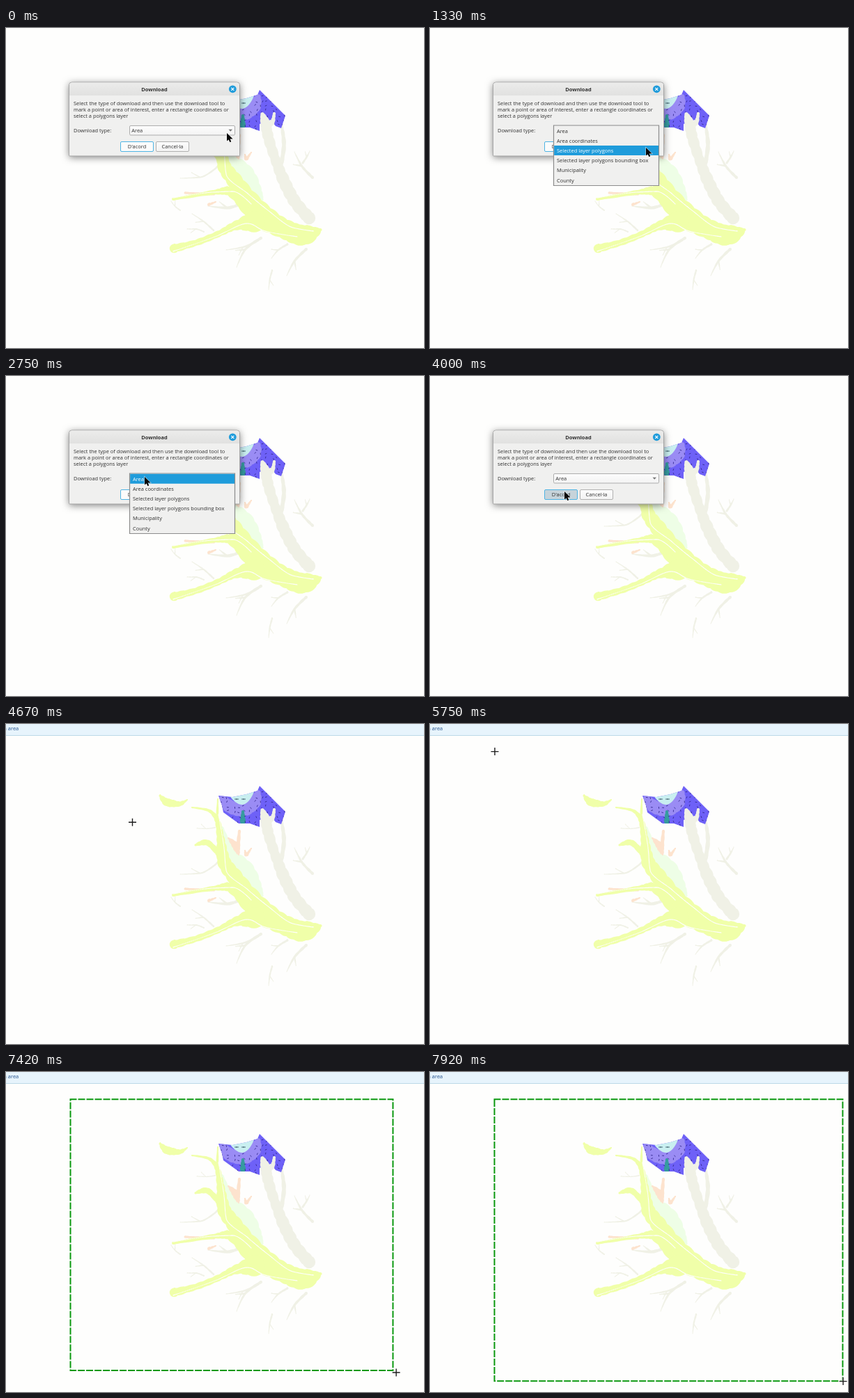
An HTML page with a canvas for the animation above (8000 ms loop, 600 by 460 pixels).

```html
<!DOCTYPE html>
<html lang="ca">
<head>
<meta charset="utf-8">
<title>Download area</title>
<style>
html, body { margin: 0; width: 100%; height: 100%; overflow: hidden; background: #fefefd; }
canvas { display: block; }
</style>
</head>
<body>
<canvas id="stage" width="600" height="460"></canvas>
<script>
const W = 600, H = 460, LOOP = 8000, FPS = 12;
const FONT = '"Open Sans", "Noto Sans", sans-serif';
const PAPER = '#fefefd', INK = '#303030', BLUE = '#1f9cdb';
const ctx = document.getElementById('stage').getContext('2d');

// Steps at which the interface changes
const LIST_OPEN = 5, LIST_CLOSE = 38, PRESS = 47, ACCEPT = 53, DRAG = 73;

const OPTIONS = ['Area', 'Area coordinates', 'Selected layer polygons',
  'Selected layer polygons bounding box', 'Municipality', 'County'];
const ROW = 14.2, LIST_TOP = 141;

// Key poses: [step, x, y]
const ARROW = [[0, 317, 151], [3, 317, 146], [11, 317, 146], [16, 310, 172], [21, 315, 215],
  [23, 315, 217], [26, 288, 177], [33, 199, 145], [40, 199, 145], [45, 193, 166]];
const CROSS = [[52, 193, 168], [62, 142, 71], [67, 93, 39.6], [72, 93, 39.6],
  [82, 432, 341.6], [92, 586, 444.6], [95, 593, 444.6]];

// Monotone cubic interpolation through the keys
function at(keys, t, c) {
  const last = keys.length - 1;
  if (t <= keys[0][0]) return keys[0][c];
  if (t >= keys[last][0]) return keys[last][c];
  let i = 0;
  while (t >= keys[i + 1][0]) i++;
  const slope = j => j < 0 || j >= last ? 0
    : (keys[j + 1][c] - keys[j][c]) / (keys[j + 1][0] - keys[j][0]);
  const tangent = j => {
    const a = slope(j - 1), b = slope(j);
    return a * b <= 0 ? 0 : 2 * a * b / (a + b);
  };
  const h = keys[i + 1][0] - keys[i][0], u = (t - keys[i][0]) / h;
  const p = keys[i][c], q = keys[i + 1][c];
  return p + (q - p) * u * u * (3 - 2 * u)
    + h * u * (1 - u) * ((1 - u) * tangent(i) - u * tangent(i + 1));
}
const point = (keys, t) => [at(keys, t, 1), at(keys, t, 2)];

function random(seed) {
  return () => (seed = (seed * 16807) % 2147483647) / 2147483647;
}

function makeMap() {
  const map = document.createElement('canvas');
  map.width = W;
  map.height = H;
  const g = map.getContext('2d');
  const rnd = random(71);
  const LIME = '#f0ffa9', GREY = '#f0f1e6', PEACH = '#fde3ce', MINT = '#eefee6';

  const fill = (color, path) => {
    g.fillStyle = color;
    g.fill(path);
  };
  // A band along a few [x, y, width] points, with a slightly uneven edge
  const band = (color, ...pts) => {
    const keys = pts.map((p, i) => [i, ...p]);
    const path = new Path2D();
    for (let t = 0; t <= pts.length - 1; t += 0.02) {
      const [x, y] = point(keys, t);
      const r = at(keys, t, 3) / 2 * (1 + 0.08 * Math.sin(t * 17));
      path.moveTo(x + r, y);
      path.arc(x, y, r, 0, 7);
    }
    fill(color, path);
  };
  // A tapering side valley with one twig
  const stream = (x0, y0, x1, y1, w = 2.6) => {
    const bend = (rnd() - 0.5) * 0.25, dx = x1 - x0, dy = y1 - y0;
    const mx = x0 + dx / 2 - dy * bend, my = y0 + dy / 2 + dx * bend;
    const a = Math.atan2(dy, dx) + (rnd() < 0.5 ? 0.8 : -0.8), len = 5 + Math.hypot(dx, dy) / 6;
    band(GREY, [x0, y0, w], [mx, my, w * 0.8], [x1, y1, 1]);
    band(GREY, [mx, my, w * 0.7], [mx + Math.cos(a) * len, my + Math.sin(a) * len, 1]);
  };

  stream(303, 200, 250, 216);
  stream(298, 291, 267, 267);
  stream(284, 293, 260, 289, 2);
  stream(300, 149, 274, 150, 1.5);
  stream(250, 262, 237, 249, 2);
  stream(362, 305, 316, 319, 3);
  stream(366, 302, 331, 344, 4);
  stream(431, 318, 403, 356, 4);
  stream(382, 349, 377, 376);
  stream(440, 215, 414, 178, 4);
  stream(426, 194, 436, 177, 3);
  stream(404, 311, 381, 331, 3);
  stream(343, 250, 290, 256, 5);
  band(GREY, [396, 142, 4], [399, 168, 6], [394, 200, 6]);

  band(MINT, [310, 150, 5], [322, 184, 14], [344, 211, 25], [362, 238, 12], [368, 247, 3]);
  band(PEACH, [319, 164, 2], [330, 176, 10], [334, 188, 2]);
  band(PEACH, [335, 154, 4], [333, 176, 6]);
  band(PEACH, [343, 182, 2], [345, 188, 5], [352, 179, 2]);
  band(PEACH, [257, 237, 3], [299, 239, 3]);
  band(PEACH, [291, 254, 4], [301, 250, 2]);

  // Main valley and its arms
  band(LIME, [221, 103, 3], [232, 113, 11], [248, 115, 7], [260, 109, 2]);
  band(LIME, [267, 120, 2], [290, 124, 4], [303, 138, 7], [308, 165, 11], [312, 195, 18], [330, 222, 22],
    [362, 266, 34], [400, 289, 27], [426, 298, 28], [452, 290, 3]);
  band(LIME, [304, 108, 2], [303, 140, 5]);
  band(LIME, [272, 174, 3], [287, 170, 8], [305, 186, 8]);
  band(LIME, [240, 246, 4], [300, 236, 7], [318, 234, 12], [342, 254, 16]);
  band(LIME, [241, 317, 12], [272, 309, 9], [305, 296, 9], [330, 284, 13], [358, 278, 30]);

  band(PAPER, [305, 130, 1.2], [313, 178, 1.2], [316, 210, 1.2], [347, 238, 1.2], [376, 262, 1.2], [412, 287, 1.2], [441, 292, 1.2]);
  band(PAPER, [240, 244, 1.2], [296, 236, 1.2], [326, 235, 1.2], [352, 253, 1.2]);
  band(PAPER, [240, 321, 1.2], [300, 300, 1.2], [346, 281, 1.2], [372, 292, 1.2], [418, 300, 1.2]);

  // Uplands
  const upland = new Path2D('M305 103L325 105 345 101 361 96 364 89 401 126 395 144 387 141 380 132 364 138 ' +
    '364 148 350 143 334 143 312 127 310 117Z');
  fill('#6e61f7', upland);
  g.save();
  g.clip(upland);
  band('#9a8cf4', [311, 108, 10], [322, 119, 18], [340, 124, 17], [356, 113, 18], [362, 98, 6]);
  fill('#c9eff0', new Path2D('M320 102L357 95Q349 116 338 116 329 115 320 102Z'));
  band('#369ba0', [340, 126, 4], [340, 140, 8]);
  g.lineWidth = 0.9;
  g.strokeStyle = '#352a90';
  for (let y = 96; y < 148; y += 7) {
    for (let x = 308; x < 400; x += 8) {
      const px = x + rnd() * 5, py = y + rnd() * 4, a = rnd() * 3;
      if (px > 322 && px < 355 && py < 116) continue;
      const dx = Math.cos(a) * 1.4, dy = Math.sin(a) * 1.4;
      g.stroke(new Path2D(`M${px - dx} ${py - dy}L${px + dx} ${py + dy}`));
    }
  }
  g.strokeStyle = '#41616e';
  for (const x of [328, 338]) g.stroke(new Path2D(`M${x} 108h6m-3-1v2`));
  g.restore();

  // Right valley, reaching up into the uplands
  band(GREY, [368, 124, 5], [372, 136, 13], [376, 155, 15], [387, 190, 14], [400, 222, 17], [415, 250, 17], [435, 273, 17]);
  band(GREY, [385, 123, 4], [383, 134, 6], [374, 142, 10]);
  return map;
}

function box(x, y, w, h, r, color, border, width = 1) {
  ctx.beginPath();
  ctx.roundRect(x, y, w, h, r);
  ctx.fillStyle = color;
  ctx.fill();
  if (!border) return;
  ctx.strokeStyle = border;
  ctx.lineWidth = width;
  ctx.stroke();
}

function text(str, x, y, color = INK, align = 'left', weight = 400) {
  ctx.font = `${weight} 7.45px ${FONT}`;
  ctx.textAlign = align;
  ctx.fillStyle = color;
  ctx.fillText(str, x, y);
}

function shade(y, h, top, bottom) {
  const g = ctx.createLinearGradient(0, y, 0, y + h);
  g.addColorStop(0, top);
  g.addColorStop(1, bottom);
  return g;
}

function button(label, x, face, border) {
  box(x, 163.5, 47, 14, 1.5, face, border);
  text(label, x + 23.5, 173, INK, 'center');
}

function drawDialog(press) {
  ctx.save();
  ctx.shadowColor = 'rgba(0,0,0,.5)';
  ctx.shadowBlur = 11;
  ctx.shadowOffsetY = 2;
  box(90.5, 78, 245, 106, [4, 4, 1, 1], '#f0f0ef');
  ctx.restore();
  box(90.5, 78, 245, 106, [4, 4, 1, 1], '#f0f0ef', '#a5a5a5');
  box(91, 78.5, 244, 18.5, [4, 4, 0, 0], shade(78, 19, '#ececeb', '#e1e1e0'));
  text('Download', 213, 90.7, INK, 'center', 700);

  box(319.9, 82.4, 10.8, 10.8, 5.4, BLUE);
  ctx.strokeStyle = '#fff';
  ctx.lineWidth = 1.2;
  ctx.stroke(new Path2D('M323.3 85.8l4 4m0-4l-4 4'));

  ['Select the type of download and then use the download tool to',
    'mark a point or area of interest, enter a rectangle coordinates or',
    'select a polygons layer'].forEach((str, i) => text(str, 97, 111 + i * 9));
  text('Download type:', 97, 149.7);

  const plain = y => shade(y, 14, '#fdfdfd', '#f3f3f3');
  box(177.5, 140.5, 151, 13.5, 1.5, plain(140), '#adadad');
  text('Area', 180.3, 149.7);
  ctx.fillStyle = '#777';
  ctx.fill(new Path2D('M319.5 145.8h5.5l-2.8 3z'));
  button("D'acord", 164.5, ['#fbfbfb', '#dfe7eb', '#c6d3da'][press], '#4fb4e4');
  button('Cancel·la', 215.5, plain(163), '#b0b0b0');
}

function drawList(active) {
  box(177.5, 140, 151, 86.5, 0, '#f0f0ef', '#8c8c8c', 1.2);
  OPTIONS.forEach((name, i) => {
    const y = LIST_TOP + i * ROW;
    if (i === active) box(178.2, y - 0.3, 149.8, 14, 0, BLUE);
    text(name, 182, y + 9.6, i === active ? '#fff' : INK);
  });
}

function drawArrow(x, y) {
  const shape = new Path2D('M0 0V11.6L2.6 9.4 4.4 13.2 6.3 12.3 4.6 8.6H8.6Z');
  ctx.save();
  ctx.translate(x, y);
  ctx.strokeStyle = 'rgba(255,255,255,.7)';
  ctx.lineWidth = 1.2;
  ctx.stroke(shape);
  ctx.fillStyle = '#080808';
  ctx.fill(shape);
  ctx.restore();
}

function drawCross(x, y) {
  const shape = new Path2D(`M${x - 5.5} ${y}h11M${x} ${y - 5.5}v11`);
  ctx.strokeStyle = 'rgba(255,255,255,.8)';
  ctx.lineWidth = 2.6;
  ctx.stroke(shape);
  ctx.strokeStyle = '#1c1c1c';
  ctx.lineWidth = 1.4;
  ctx.stroke(shape);
}

function drawBar() {
  ctx.fillStyle = '#e7f4fc';
  ctx.fillRect(0, 0, W, 16);
  ctx.fillStyle = '#bcd9e8';
  ctx.fillRect(0, 16, W, 1);
  text('n area', 18.2, 9, '#1f4f8c', 'right');
}

// The rectangle trails the crosshair slightly
function drawSelection(step) {
  const [x, y] = point(CROSS, step - 0.32);
  ctx.save();
  ctx.strokeStyle = '#0a980f';
  ctx.lineWidth = 2;
  ctx.lineCap = 'square';
  ctx.setLineDash([8, 4]);
  ctx.strokeRect(92.5, 39.3, x - 93, y - 39.7);
  ctx.restore();
}

const map = makeMap();

function draw(step) {
  ctx.fillStyle = PAPER;
  ctx.fillRect(0, 0, W, H);
  ctx.drawImage(map, 0, 0);
  if (step < ACCEPT) {
    const [x, y] = point(ARROW, step);
    drawDialog(Math.max(0, Math.min(2, step - PRESS + 1)));
    if (step >= LIST_OPEN && step < LIST_CLOSE) {
      drawList(Math.max(0, Math.floor((y - LIST_TOP) / ROW)));
    }
    drawArrow(x, y);
  } else {
    drawBar();
    if (step >= DRAG) drawSelection(step);
    drawCross(...point(CROSS, step));
  }
}

function tick() {
  const t = performance.now() % LOOP;
  draw(Math.floor(t * FPS / 1000 + 0.05) % 96);
  requestAnimationFrame(tick);
}
tick();
</script>
</body>
</html>
```
